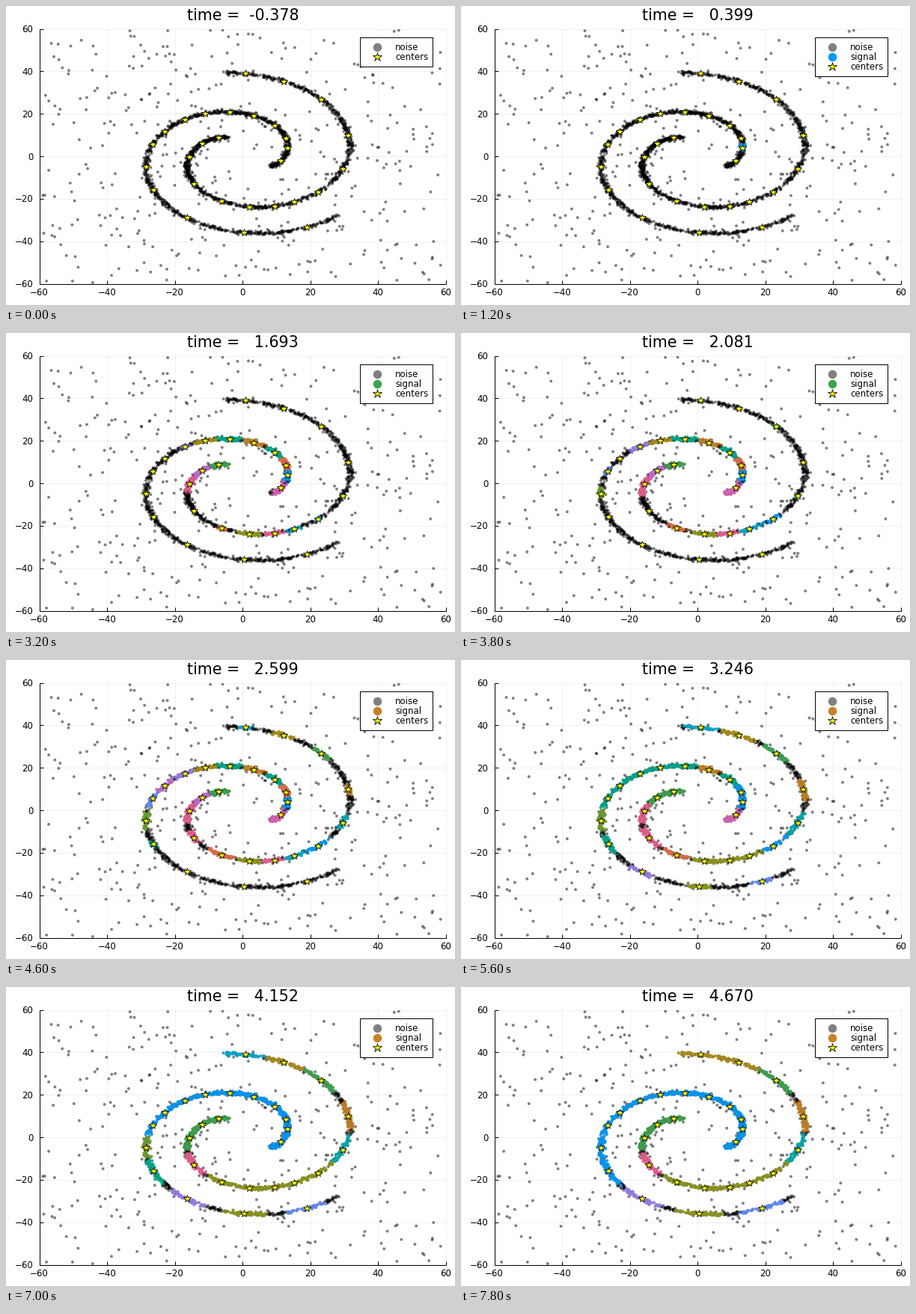
A matplotlib script for the animation above (8000 ms loop, 600x400 px).

```python
import numpy as np
import matplotlib.pyplot as plt
from matplotlib.animation import FuncAnimation
from matplotlib.colors import to_rgba
from matplotlib.patches import Rectangle

W, H, DPI = 600, 400, 100
FRAMES, INTERVAL = 40, 200
LEFT, RIGHT, TOP, BOTTOM = 44.5, 587.5, 30.5, 371.5
PX = 72 / DPI  # points per pixel
PITCH = 4.97   # arm radius per radian

PALETTE = dict(
    blue="#009AFA", orange="#E36F47", green="#3EA44E", violet="#C371D2",
    tan="#AC8E18", teal="#00AAAE", pink="#ED5E93", brown="#C68225",
    sea="#00A98D", olive="#8E971E", cyan="#00A9CC", purple="#9B7FE9",
    peri="#618DF6", magenta="#DD65B6", leaf="#6C9F33")
NOISE = (0, 0, 0, 0.5)

rng = np.random.default_rng(12)


def spiral(phi, turn):
    r = PITCH * phi
    return np.column_stack([r * np.cos(phi + turn), r * np.sin(phi + turn)])


def arc(phi):
    return PITCH * phi**2 / 2


class Arm:
    """Archimedean arm whose clusters grow and join; the eldest gives the colour."""

    def __init__(self, turn, stars, birth_keys, colors, size=1000):
        self.stars = np.array(stars)
        self.centers = spiral(self.stars, turn)
        self.births = np.interp(self.stars, *birth_keys)
        self.colors = np.array([to_rgba(PALETTE[c]) for c in colors.split()])

        phi = rng.uniform(2, 8, size)
        jitter = rng.normal(0, 0.45, (size, 2))
        self.xy = spiral(phi, turn) + jitter
        self.haze = spiral(rng.uniform(2, 8, 45), turn) + rng.normal(0, 2.2, (45, 2))

        # close neighbours join first, wide gaps never close
        step = np.diff(self.stars)
        mean = (self.stars[1:] + self.stars[:-1]) / 2
        self.join = np.maximum(26, 20 * step * np.sqrt(PITCH * mean) - 3)

        ds = arc(phi)[:, None] - arc(self.stars)
        self.near = np.abs(ds).argmin(axis=1)
        ds = np.abs(ds).min(axis=1)
        self.dist = ds + 0.5 * np.hypot(*jitter.T)
        self.cell = np.searchsorted(self.stars, phi)
        gaps = np.concatenate([[np.inf], np.diff(arc(self.stars)), [np.inf]])
        self.free = ds < 0.47 * gaps[self.cell]

    def paint(self, frame):
        """Face colours of the points, and which of them belong to a cluster."""
        joined = frame >= self.join
        group = np.concatenate([[0], np.cumsum(~joined)])
        eldest = [min(np.flatnonzero(group == g), key=lambda k: self.births[k])
                  for g in group]
        reach = 8.5 * (1 - np.exp(-np.maximum(frame - self.births, 0) / 9))
        bridge = np.concatenate([[False], joined, [False]])
        on = (self.dist < reach[self.near]) & self.free | bridge[self.cell]
        face = np.where(on[:, None], self.colors[eldest][self.near], NOISE)
        return face, on


arms = [
    Arm(0,
        [2.25, 2.68, 3.17, 3.88, 4.43, 4.80, 5.10, 5.33, 5.64, 6.09, 6.59,
         7.14, 7.52, 7.83],
        ([2.2, 3.2, 3.9, 4.8, 5.6, 6.4, 7.4, 7.8], [9, 10, 19, 11, 14, 20, 17, 20]),
        "green violet pink pink orange olive pink cyan blue teal brown "
        "green tan cyan"),
    Arm(-0.8 * np.pi,
        [2.32, 2.80, 3.10, 3.50, 3.91, 4.26, 4.59, 4.87, 5.18, 5.45, 5.82,
         6.20, 6.71, 7.24, 7.74],
        ([2.3, 2.8, 3.1, 4.6, 5.2, 5.8, 6.2, 7.8], [12, 4, 9, 10, 18, 15, 21, 23]),
        "magenta blue orange sea brown sea tan purple violet peri leaf "
        "sea purple olive peri")]

field = np.vstack([rng.uniform(-59.8, 59.8, (370, 2))] + [a.haze for a in arms])
points = np.vstack([field] + [a.xy for a in arms])

fig = plt.figure(figsize=(W / DPI, H / DPI), dpi=DPI, facecolor="white")
ax = fig.add_axes([LEFT / W, 1 - BOTTOM / H, (RIGHT - LEFT) / W, (BOTTOM - TOP) / H])
ax.set(xlim=(-60, 60), ylim=(-60, 60))
ax.axis("off")

# overlay in pixel units for axis furniture, title and legend
page = fig.add_axes([0, 0, 1, 1])
page.set(xlim=(0, W), ylim=(H, 0))
page.axis("off")
page.patch.set_visible(False)


def label(x, y, text, px=11.8, **kw):
    return page.text(x, y, text, fontsize=px * PX, family="DejaVu Sans",
                     va="baseline", **kw)


def line(x, y):
    page.plot(x, y, color="black", lw=PX, solid_capstyle="butt", zorder=1)


for v in range(-60, 61, 20):
    x = LEFT + (v + 60) * (RIGHT - LEFT) / 120
    y = BOTTOM - (v + 60) * (BOTTOM - TOP) / 120
    name = str(v).replace("-", "\u2212")
    for rule in (ax.axvline, ax.axhline):
        rule(v, color="black", alpha=0.06, lw=PX, zorder=0, clip_on=False)
    line([x, x], [BOTTOM, BOTTOM - 5])
    line([LEFT, LEFT + 5], [y, y])
    label(x, 387.2, name, ha="center")
    label(36.3, y + 4.5, name, ha="right")
line([LEFT, LEFT], [TOP, BOTTOM])
line([LEFT, RIGHT], [BOTTOM, BOTTOM])

dots = ax.scatter(*points.T, s=(3.9 * PX)**2, linewidths=0.3, zorder=2)
star = dict(marker="*", mfc="yellow", mec="black", mew=0.8 * PX, ls="none")
for arm in arms:
    ax.plot(*arm.centers.T, ms=10.5 * PX, zorder=4, **star)

title = label(316.8, 18.9, "", 20.6, ha="center")
box = page.add_patch(Rectangle((472.5, 41.5), 97, 39, fc="white", ec="black",
                               lw=PX, zorder=5))
disc = dict(marker="o", ms=11.5 * PX, mew=0, ls="none", zorder=6)
page.plot(496.3, 55, color="#808080", **disc)
label(520, 59.2, "noise", zorder=6)
signal, = page.plot(496.3, 68, **disc)
signal_text = label(520, 72.4, "signal", zorder=6)
key, = page.plot(496.3, 68, ms=12.5 * PX, zorder=6, **star)
key_text = label(520, 72.4, "centers", zorder=6)


def draw(frame):
    title.set_text(f"time = {-0.378 + frame * 5.048 / 39:7.3f}")

    painted = [arm.paint(frame) for arm in arms]
    face = np.vstack([np.tile(NOISE, (len(field), 1))] + [f for f, _ in painted])
    on = np.concatenate([np.zeros(len(field), bool)] + [o for _, o in painted])
    edge = np.where(on[:, None], (0.3, 0.3, 0.3, 0.25), (0, 0, 0, 0))
    dots.set_facecolor(face)
    dots.set_edgecolor(edge)

    found = bool(on.any())
    signal.set_visible(found)
    signal_text.set_visible(found)
    tone = "brown" if frame > 20 else "green" if frame > 8 else "blue"
    signal.set_color(PALETTE[tone])
    shift = 13 if found else 0
    box.set_height(39 + shift)
    key.set_ydata([68 + shift])
    key_text.set_y(72.4 + shift)
    return dots, title, box, signal, signal_text, key, key_text


anim = FuncAnimation(fig, draw, frames=FRAMES, interval=INTERVAL,
                     repeat=True, repeat_delay=0, blit=False)
plt.show()
```
